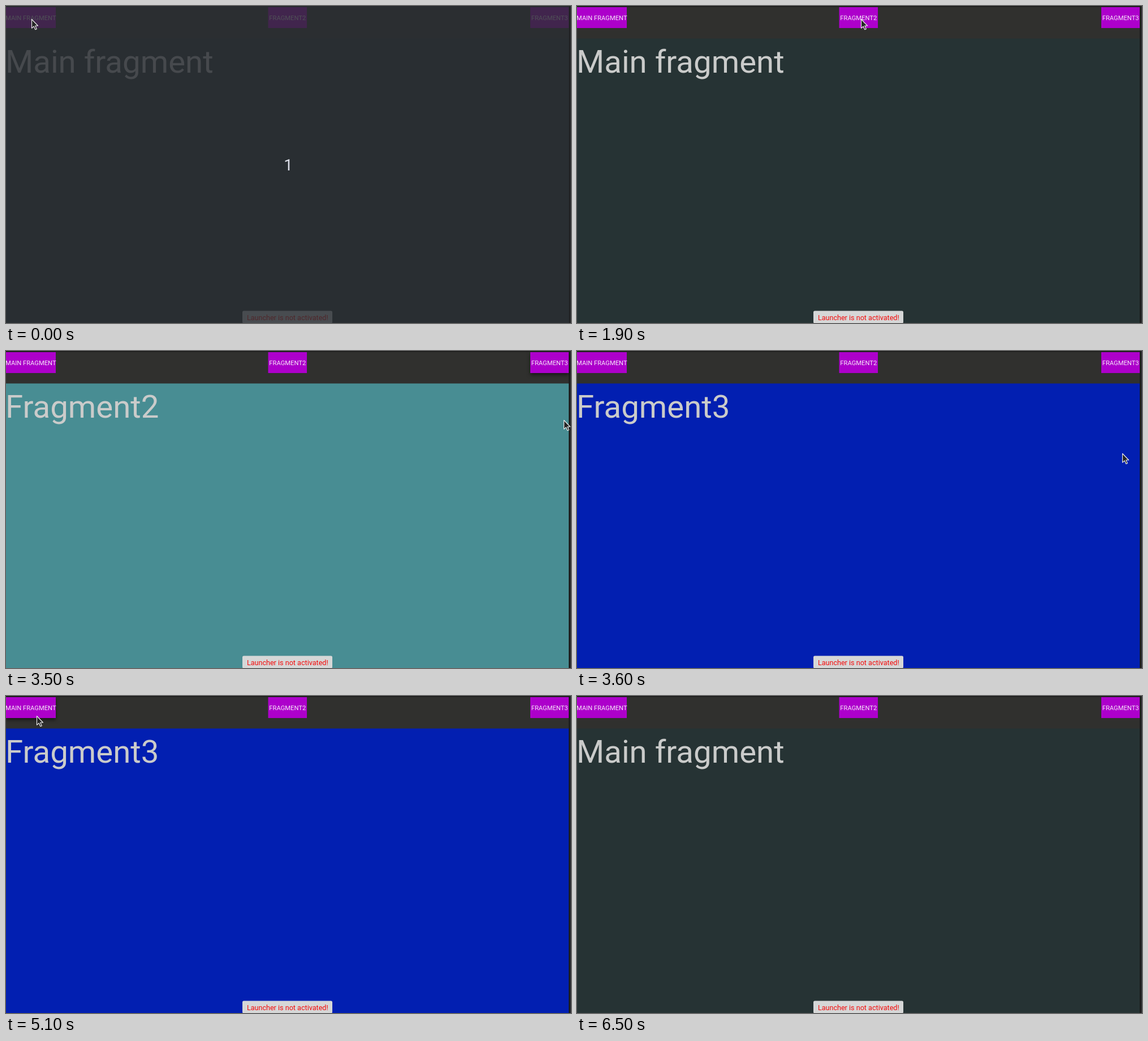
Animation, 999 px wide and 561 px high, one loop 6700 ms. Source, as an HTML page:

```html
<!DOCTYPE html>
<html lang="en">
<head>
<meta charset="utf-8">
<title>Fragments</title>
<style>
  html, body { margin: 0; width: 100%; height: 100%; overflow: hidden; background: #2b2d2f; }
  svg { display: block; width: 999px; height: 561px; font-family: Roboto, sans-serif; }
  .button rect { fill: #ad00cb; }
  .button text { fill: #f7ebf9; font-size: 11.2px; text-anchor: middle; }
  .button.pressed { filter: drop-shadow(0 3px 3px rgba(0, 0, 0, .55)); }
  #title { font-size: 56.4px; fill: #cacbca; }
  #toast rect { fill: #d6d7d7; }
  #toast text { font-size: 12.6px; fill: #f40b0b; text-anchor: middle; }
  #countdown rect { fill: rgba(42, 46, 51, .82); }
  #countdown text { font-size: 28px; fill: #dde0ea; text-anchor: middle; }
  #cursor { fill: #262626; stroke: #f2f2f2; stroke-width: 1.1; stroke-linejoin: round; }
</style>
</head>
<body>
<svg viewBox="0 0 999 561">
  <rect width="997" height="561" fill="#191919"/>
  <rect y="1.5" width="995" height="560" fill="#30302e"/>
  <rect id="content" y="57.5" width="995" height="504"/>
  <text id="title" x="-1" y="118"></text>
  <g class="button"><rect y="2" width="88" height="37"/><text x="43.8" y="25">MAIN FRAGMENT</text></g>
  <g class="button"><rect x="463.5" y="2" width="68.5" height="37"/><text x="497.8" y="25">FRAGMENT2</text></g>
  <g class="button"><rect x="927" y="2" width="68" height="37"/><text x="961.2" y="25">FRAGMENT3</text></g>
  <g id="toast"><rect x="418" y="539.5" width="159" height="22" rx="2.5"/><text x="497.8" y="556">Launcher is not activated!</text></g>
  <g id="countdown"><rect width="996" height="561"/><text x="499" y="291">1</text></g>
  <path id="cursor" d="M0 0V15.8L3.7 12.5L6.3 18.3L8.8 17.2L6.3 11.5H11Z"/>
</svg>
<script>
  const LOOP = 6700, TICK = 100, COUNTDOWN_END = 100, CURSOR_EXIT = 6500;

  // A scene begins when its button is released
  const scenes = [
    { at: 0, title: 'Main fragment', color: '#263334' },
    { at: 2100, title: 'Fragment2', color: '#488d93' },
    { at: 3600, title: 'Fragment3', color: '#021fb1' },
    { at: 5200, title: 'Main fragment', color: '#263334' }
  ];

  const presses = [
    { button: 1, from: 2100, to: 2300 },
    { button: 2, from: 3500, to: 3600 },
    { button: 0, from: 5000, to: 5200 }
  ];

  // The pointer rests between moves; bow bends a move downwards
  const home = { x: 45, y: 23 };
  const moves = [
    { from: 700, to: 1400, x: 562, y: 15, bow: 27 },
    { from: 1400, to: 1600, x: 502, y: 23 },
    { from: 2100, to: 2700, x: 887, y: 60 },
    { from: 2700, to: 3000, x: 955, y: 18 },
    { from: 3400, to: 3500, x: 986, y: 122 },
    { from: 3500, to: 3600, x: 964, y: 181 },
    { from: 3600, to: 4100, x: 499, y: 3 },
    { from: 4100, to: 4700, x: 51, y: 32, bow: 20 },
    { from: 4900, to: 5300, x: 56, y: 38 },
    { from: 5400, to: 5700, x: 88, y: 76 },
    { from: 6000, to: 6400, x: 47, y: 0 }
  ];

  const byId = id => document.getElementById(id);
  const content = byId('content'), title = byId('title');
  const countdown = byId('countdown'), cursor = byId('cursor');
  const buttons = document.querySelectorAll('.button');
  const show = (node, visible) => node.setAttribute('visibility', visible ? 'visible' : 'hidden');
  const ease = k => k * k * (3 - 2 * k);

  function pointerAt(t) {
    let { x, y } = home;
    for (const { from, to, x: toX, y: toY, bow = 0 } of moves) {
      if (t <= from) break;
      const k = ease(Math.min(1, (t - from) / (to - from)));
      x += (toX - x) * k;
      y += (toY - y) * k + bow * Math.sin(Math.PI * k);
    }
    return [Math.round(x), Math.round(y)];
  }

  function draw(t) {
    const scene = scenes.filter(s => s.at <= t).pop();
    content.setAttribute('fill', scene.color);
    title.textContent = scene.title;
    for (const { button, from, to } of presses) {
      buttons[button].classList.toggle('pressed', t >= from && t < to);
    }
    show(countdown, t < COUNTDOWN_END);
    show(cursor, t < CURSOR_EXIT);
    const [x, y] = pointerAt(t);
    cursor.setAttribute('transform', `translate(${x + 0.5} ${y + 0.5})`);
  }

  const start = performance.now();
  function frame() {
    const t = (performance.now() - start) % LOOP;
    draw(Math.floor(t / TICK) * TICK);
    requestAnimationFrame(frame);
  }
  frame();
</script>
</body>
</html>
```
